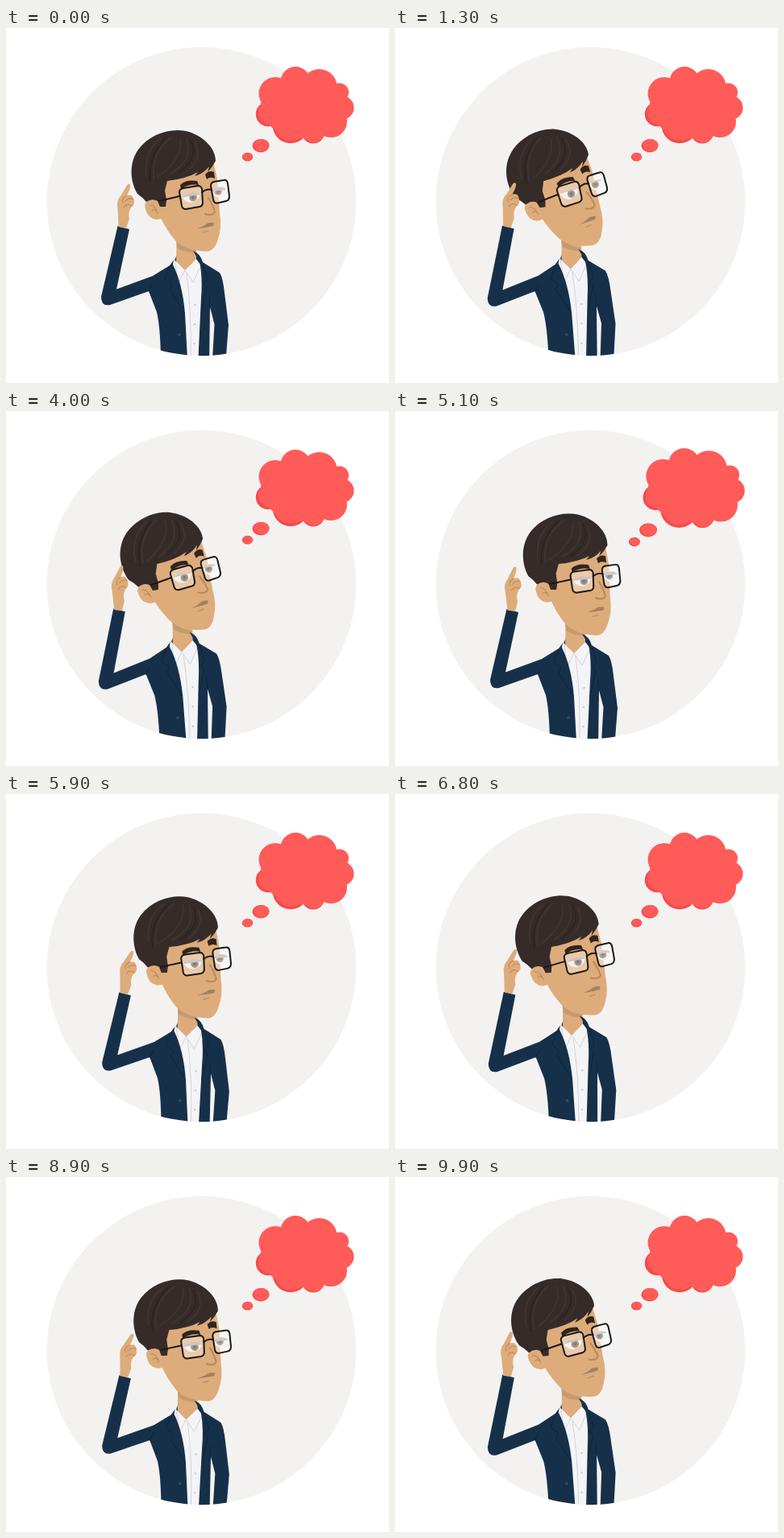
Recreate the animation shown at these times as an HTML page. Size 475 by 441 pixels, loop 10000 ms.

```html
<!DOCTYPE html>
<html lang="en">
<head>
<meta charset="utf-8">
<title>Thinking man</title>
<style>
html, body { margin: 0; width: 100%; height: 100%; overflow: hidden; background: #fff; }
svg { display: block; width: 100vw; height: 100vh; }
.skin { fill: #deac7a; }
.shade { fill: #c59a6e; }
.navy { fill: #17304a; }
.dark { fill: #f64a4b; }
.red { fill: #ff5b58; }
.line { fill: none; stroke-linecap: round; stroke-linejoin: round; }
</style>
</head>
<body>
<svg viewBox="0 0 475 441">
  <defs>
    <clipPath id="disc"><circle cx="242.5" cy="215.5" r="191.8"/></clipPath>
    <clipPath id="leftEye"><path d="M218 209Q228 201 241 206Q240 215 229 217Q221 216 218 209Z"/></clipPath>
    <clipPath id="rightEye"><path d="M255 202Q263 195 272 199Q273 208 265 211Q258 210 255 202Z"/></clipPath>
  </defs>
  <circle cx="242.5" cy="215.5" r="191.8" fill="#f3f2f1"/>

  <g id="cloud">
    <g class="dark">
      <circle cx="325" cy="107" r="15.2"/><circle cx="353" cy="121" r="22.3"/>
      <circle cx="381" cy="129.500" r="14"/>
      <ellipse cx="316" cy="146.2" rx="10.5" ry="8.2"/>
      <ellipse cx="299.5" cy="160.2" rx="6.7" ry="5.4"/>
    </g>
    <g class="red">
      <circle cx="334" cy="81.5" r="20.5"/><circle cx="359" cy="66.5" r="18.5"/>
      <circle cx="388.5" cy="73" r="22"/><circle cx="413.5" cy="80" r="11.5"/>
      <circle cx="416.500" cy="99" r="15"/><circle cx="403" cy="116" r="20"/>
      <circle cx="382" cy="128.500" r="13.7"/><circle cx="354" cy="118" r="21.8"/>
      <circle cx="328" cy="105" r="15"/>
      <ellipse cx="370" cy="97" rx="54" ry="40"/>
      <ellipse cx="317" cy="145.6" rx="9.5" ry="7.5"/>
      <ellipse cx="300" cy="159.8" rx="6" ry="4.9"/>
    </g>
  </g>

  <g clip-path="url(#disc)"><g id="body">
    <path class="navy" d="M208 296Q208 285 216 280H234Q242 284 243 296Z"/>
    <path class="skin" d="M212 250L236 260V288L222 302L211 291Z"/>
    <path class="shade" d="M211 264Q222 274 235 275L234 279Q222 279 212 273Z"/>
    <path fill="#f4f4f7" d="M209 288L222 301L236 287L246 300L241 420H224L214 325L205 296Z"/>
    <path class="line" stroke="#cfd0d7" stroke-width=".9" d="M210 290L213 318L222 301L232 316L241 297M224 305Q230 350 229 410"/>
    <g fill="#c9cad1"><circle cx="234.500" cy="344" r="1.2"/><circle cx="234" cy="368" r="1.2"/><circle cx="233.5" cy="392" r="1.2"/></g>
    <path class="navy" d="M138.500 246L153 250L137 324.500L182 308L203 295L213 282Q207 288 207 294Q219 318 222 355L225.500 420H192Q192 375 187 353L177 327L129 344Q118 346 118 334Z"/>
    <path class="navy" d="M232 277Q241 280 244 291L265 304Q269 310 271 329L276 369L272 420H255.500L258.500 368L253 347L252 420H238L242 335Q244 310 240 290Z"/>
    <path class="line" stroke="#0f243c" stroke-width="1" d="M203 296L197 312L206 319L203 325L221 354M244 292L250 312L245 318L249 323L242 354M252 333L253 347M177 327L182 318"/>
    <circle cx="215" cy="381" r="1.8" fill="#3a4b63"/>
  </g></g>

  <g id="head">
    <path class="skin" d="M188 190L192 236Q199 251 210 264Q223 277 249 277.500Q259 277 263 262Q268 248 265 230L262 188L256 160L215 160Z"/>
    <path class="skin" d="M194 219Q187 211 178 213Q170 217 173 225Q176 237 187 238L196 236Z"/>
    <path class="line" stroke="#bd8c5d" stroke-width="1.2" d="M178 220Q184 219 188 230M181 227Q184 224 187 228"/>
    <path fill="#352b29" d="M163 206C154 191 152 168 164 151C178 132 203 124 223 128C244 133 260 149 260 165Q256 173 250 179L252 172Q245 181 234 184L238 179Q224 187 200 190L197 202L199 214L198 222H191L188 215Q181 211 174 216Q169 210 163 206Z"/>
    <path class="line" stroke="#493e38" stroke-width="2" opacity=".5" d="M192 137Q170 154 174 184M205 136Q180 154 183 187M216 138Q220 163 188 185M224 138Q233 164 204 181M235 143Q244 164 223 179"/>
    <path class="line" stroke="#2b2220" stroke-width="1.4" d="M199 136Q175 160 179 190M229 140Q240 162 214 180"/>
    <path fill="#30251f" d="M216 195Q223 188 237 190L239 195Q228 193 217 200Z"/>
    <path fill="#30251f" d="M247 182Q252 176 258 179L259 187Q253 184 249 188Z"/>
    <g clip-path="url(#leftEye)">
      <rect x="215" y="198" width="30" height="22" fill="#eeebe8"/>
      <circle cx="232" cy="210.500" r="4.8" fill="#75614f"/><circle cx="232" cy="210.500" r="2.3" fill="#3c332e"/>
      <path class="lid" fill="#b3a39a" d="M212 194H246V207Q229 208 212 212Z"/>
    </g>
    <g clip-path="url(#rightEye)">
      <rect x="250" y="190" width="26" height="24" fill="#eeebe8"/>
      <circle cx="263" cy="203" r="4.6" fill="#75614f"/><circle cx="263" cy="203" r="2.2" fill="#3c332e"/>
      <path class="lid" fill="#b3a39a" d="M250 190H277V201Q265 201 250 205Z"/>
    </g>
    <path class="line" stroke="#b98858" stroke-width="2" d="M251 211Q257 221 259 228Q257 234 247 231"/>
    <path fill="#a18163" d="M236 249.500Q246 246 249 243Q253 241 258 242L257 246Q247 248 236 249.500Z"/>
    <path class="line" stroke="#bc8d60" stroke-width="1.3" d="M244 254L251 252"/>
    <g class="line" stroke="#191819" stroke-width="2">
      <path fill="#fff" fill-opacity=".36" d="M220 199L238 196Q242 196 243 200L244 217Q244 221 240 222L223 225Q219 225 218 221L215 204Q215 200 220 199Z"/>
      <path fill="#fff" fill-opacity=".42" d="M258 191L270 189Q274 188 275 193L277 209Q277 214 273 215L262 217.500Q258 218 257 213L254 196Q254 192 258 191Z"/>
      <path d="M243 204Q249 199 255 201M190 215L215 209"/>
    </g>
  </g>

  <g id="arm"><g id="hand">
    <path class="skin" d="M139.500 247L138.500 224Q136.500 214 142.500 208L149 197Q151 193 153.500 194Q156 196 150 208Q157 206 158 212Q161 219 155 223Q151 229 153 237L149 249Z"/>
    <path class="line" stroke="#bd8c5d" stroke-width="1.1" d="M150 208Q143 211 145 217M158 213Q152 210 148 215M156 221Q150 217 146 223"/>
  </g></g>
</svg>
<script>
const LOOP = 10000, CYCLE = 3000, STEP = 100;
const byId = id => document.getElementById(id);
const [cloud, body, head, arm, hand] = ['cloud', 'body', 'head', 'arm', 'hand'].map(byId);
const lids = document.querySelectorAll('.lid');

// Each track lists [time in the cycle, value].
const nod = [[0, 0], [500, -.12], [800, -.37], [900, -.65], [1100, -.94], [1300, -1],
  [1550, -.85], [1850, -.2], [2100, .18], [2450, .33], [2800, .3], [CYCLE, 0]];
const sway = [[0, 0], [500, -.35], [800, -.67], [900, -.95], [1300, -1], [1600, -.75],
  [2100, 0], [2500, .6], [2800, .7], [CYCLE, 0]];
const scratch = [[0, 0], [300, -4], [550, 4], [800, 1.5], [900, -2], [1100, -3], [1300, 3],
  [1550, -4], [1800, 4], [2100, -4], [2400, 4], [2600, -4], [2800, 4], [CYCLE, 0]];

function sample(track, t) {
  const i = track.findIndex(key => key[0] > t);
  const [t0, a] = track[i - 1], [t1, b] = track[i];
  return a + (b - a) * (t - t0) / (t1 - t0);
}

function setTransform(el, value) {
  el.setAttribute('transform', value);
}

function draw(time) {
  const t = Math.floor(time % LOOP / STEP) * STEP % CYCLE;
  const tilt = sample(nod, t), lean = sample(sway, t);
  const pulse = t > 1650 && t < 2750 ? Math.sin(Math.PI * (t - 1650) / 1100) ** 2 : 0;

  const pose = `translate(${235 + 1.5 * lean} 408) rotate(${1.4 * lean}) scale(1 ${1 - .018 * lean}) translate(-235 -408)`;
  setTransform(body, pose);
  setTransform(arm, pose);
  setTransform(hand, `rotate(${sample(scratch, t)} 148 248)`);
  setTransform(head, `translate(${5 * tilt} ${4 * tilt}) rotate(${8 * tilt} 225 270)`);
  lids.forEach(lid => setTransform(lid, `translate(0 ${2 * Math.min(0, tilt)})`));
  setTransform(cloud, `translate(371 96) scale(${1 + .04 * pulse}) translate(-371 -96)`);
}

let start;
function tick(now) {
  start ??= now;
  draw(now - start);
  requestAnimationFrame(tick);
}
draw(0);
requestAnimationFrame(tick);
</script>
</body>
</html>
```
